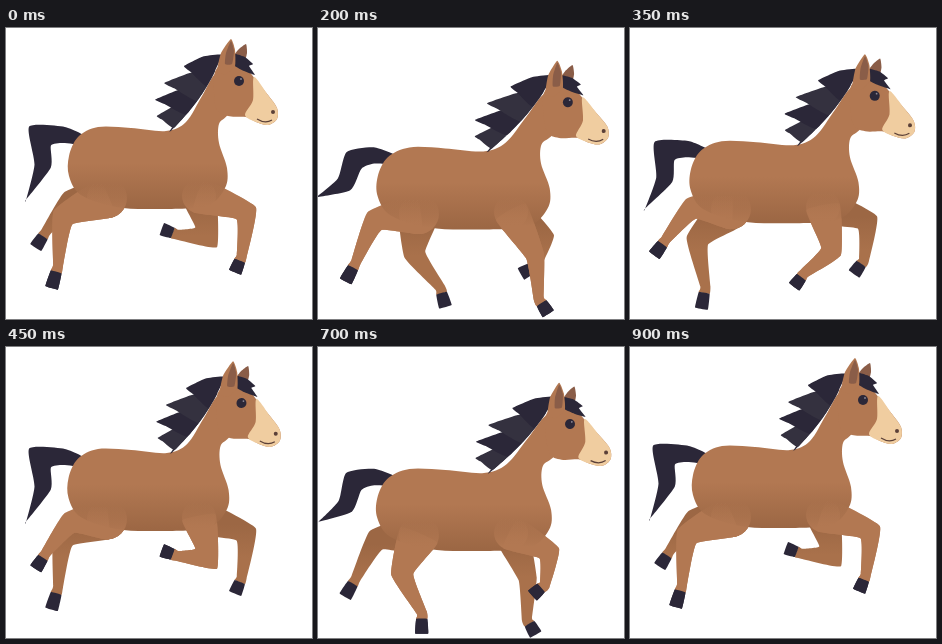
These frames come from a looping animation (306x291 px, 0.95 s). An HTML page with a canvas:

```html
<!DOCTYPE html>
<html>
<head>
<meta charset="utf-8">
<title>Trotting horse</title>
<style>
html, body { margin: 0; width: 100%; height: 100%; overflow: hidden; background: #fff }
canvas { display: block }
</style>
</head>
<body>
<canvas id="stage" width="306" height="291"></canvas>
<script>
const ctx = document.getElementById('stage').getContext('2d');
const LOOP = 950, STEP = 50, CYCLE = 900, HALF = CYCLE / 2;
const COAT = '#b27852', COAT_CLEAR = '#b2785200', SHADE = '#9c6744', FAR = '#a9714b';
const DARK = '#2b2738', STRAND = '#34313f', CREAM = '#f0cda0', EAR = '#8a5d48', LINE = '#5b4038';

// Key times of the gait, shared by the body drop and the bone angles.
const TIMES = [0, 250, 450, 600, 700];
const DROP = [0, 1, .13, .38, 1];

// Angles are degrees from straight down, positive towards the tail.
// Bones shorten by their fold as the leg swings forward, most at foldTime.
const HIND = {
  root: [101, 170], lengths: [43, 43, 21], folds: [.12, .12, .12], foldTime: 480, radii: [20, 10, 5],
  angles: [[66, 83, 84, 0, 23], [6, 28, 38, -38, -27], [16, 30, 33, -25, 0]]
};
const FORE = {
  root: [193, 168], lengths: [46, 36, 17], folds: [.12, .25, .05], foldTime: 550, radii: [17, 9, 5],
  angles: [[-70, -20, -10, -38, -62], [6, 1, 95, 32, 8], [22, -30, 110, 75, 48]]
};

const mix = (a, b, k) => a + (b - a) * k;
const mixPoint = (p, q, k) => [mix(p[0], q[0], k), mix(p[1], q[1], k)];
const bezier = (a, b, c, u) => mixPoint(mixPoint(a, b, u), mixPoint(b, c, u), u);
const pairs = (...flat) => Array.from({ length: flat.length / 2 }, (_, i) => flat.slice(2 * i, 2 * i + 2));
// The trunk sinks, stretches and leans its neck forward.
const sink = drop => ([x, y]) =>
  [x + drop * ((x - 100) * .1 + Math.max(0, 100 - y) * .14), y + 23 * drop];

// Smooth periodic interpolation through the keys.
function sample(keys, time) {
  const t = time % CYCLE, n = TIMES.length;
  const when = i => TIMES[(i + n) % n] + CYCLE * Math.floor(i / n);
  const key = i => keys[(i + n) % n];
  const i = TIMES.findLastIndex(start => start <= t);
  const span = when(i + 1) - when(i), u = (t - when(i)) / span;
  const slope = j => (key(j + 1) - key(j - 1)) / (when(j + 1) - when(j - 1)) * span;
  const d = key(i + 1) - key(i), s = slope(i), e = slope(i + 1);
  return key(i) + u * (s + u * (3 * d - 2 * s - e + u * (s + e - 2 * d)));
}

function shape(points, fill, tension = 0) {
  const n = points.length, p = i => points[(i + n) % n];
  ctx.beginPath();
  ctx.moveTo(...p(0));
  for (let i = 0; i < n; i++) {
    const [a, b, c, d] = [p(i - 1), p(i), p(i + 1), p(i + 2)];
    ctx.bezierCurveTo(
      b[0] + (c[0] - a[0]) * tension, b[1] + (c[1] - a[1]) * tension,
      c[0] - (d[0] - b[0]) * tension, c[1] - (d[1] - b[1]) * tension, ...c);
  }
  ctx.fillStyle = fill;
  ctx.fill();
}

function dot(x, y, r, fill) {
  ctx.beginPath();
  ctx.arc(x, y, r, 0, 7);
  ctx.fillStyle = fill;
  ctx.fill();
}

function fade(y0, y1, from, to) {
  const g = ctx.createLinearGradient(0, y0, 0, y1);
  g.addColorStop(0, from);
  g.addColorStop(1, to);
  return g;
}

// Mitred outline of a tapering polyline.
function limb(points, radii, fill, tension) {
  const normals = points.slice(1).map(([x, y], i) => {
    const dx = x - points[i][0], dy = y - points[i][1], len = Math.hypot(dx, dy);
    return [-dy / len, dx / len];
  });
  const left = [], right = [];
  points.forEach(([x, y], i) => {
    const a = normals[Math.max(i - 1, 0)], b = normals[Math.min(i, normals.length - 1)];
    const k = radii[i] / Math.max(1 + a[0] * b[0] + a[1] * b[1], .7);
    const dx = (a[0] + b[0]) * k, dy = (a[1] + b[1]) * k;
    left.push([x + dx, y + dy]);
    right.unshift([x - dx, y - dy]);
  });
  shape([...left, ...right], fill, tension);
}

function leg({ root, lengths, folds, foldTime, radii, angles }, time, drop, fill) {
  const swing = Math.cos((time - foldTime) / CYCLE * 2 * Math.PI);
  const joints = [[root[0], root[1] + 18 * drop]];
  lengths.forEach((length, i) => {
    const [x, y] = joints[i], a = sample(angles[i], time) * Math.PI / 180;
    const reach = length * (1 - folds[i] * swing);
    joints.push([x - reach * Math.sin(a), y + reach * Math.cos(a)]);
  });
  const [top, knee, fetlock, tip] = joints, cuff = mixPoint(fetlock, tip, .3);
  const paint = fill(top[1]);
  dot(...top, radii[0], paint);
  limb([top, knee, fetlock, cuff], [...radii, 5.5], paint, .06);
  limb([cuff, tip], [5.5, 6.5], DARK, .03);
}

function legs(time, drop, fill) {
  leg(HIND, time, drop, fill);
  leg(FORE, time, drop, fill);
}

function tail(time, drop) {
  const swing = Math.sin((time + 25) / HALF * Math.PI) ** 2;
  const hanging = pairs(80, 113, 58, 107, 34, 108, 37, 138, 21, 172);
  const flying = pairs(80, 112, 56, 107, 36, 112, 26, 136, -2, 149);
  const spine = hanging.map((p, i) => mixPoint(p, flying[i], swing)).map(([x, y]) => [x, y + 23 * drop]);
  limb(spine, [4, 8, 10, 8, 0], DARK, .1);
}

function trunk(drop) {
  const outline = pairs(63, 128, 72, 109, 92, 99, 125, 100, 160, 103, 180, 94, 196, 68, 212, 44,
    232, 60, 222, 86, 213, 96, 213, 115, 221, 140, 219, 160, 200, 178, 150, 181, 110, 179, 75, 167, 63, 148);
  shape(outline.map(sink(drop)), fade(135 + 22 * drop, 180 + 22 * drop, COAT, SHADE), .16);
}

// Overlapping pointed locks from the poll down to the withers.
function mane(drop) {
  const crest = u => bezier([216, 27], [200, 68], [168, 100], u);
  for (let i = 4; i >= 0; i--) {
    const u = i / 4, start = crest(u * .8), end = crest(Math.min(u * .8 + .4, 1.04));
    const tip = bezier([178, 38], [128, 72], [163, 104], u);
    const [x, y] = mixPoint(start, tip, .5);
    shape([start, [x, y - 4], tip, mixPoint(tip, end, .3), end].map(sink(drop)), i % 2 ? STRAND : DARK, .05);
  }
}

function head(drop) {
  ctx.save();
  ctx.translate(233 + 19 * drop, 53 + 24 * drop);
  ctx.rotate(-.07 * drop);
  ctx.translate(-233, -53);
  shape(pairs(228, 28, 233, 21, 240, 16, 241, 25, 238, 34), EAR, .08);
  shape(pairs(208, 50, 213, 38, 226, 33, 240, 40, 249, 51, 262, 67, 271, 80, 271, 91,
    262, 97, 250, 94, 240, 89, 222, 88, 210, 80), COAT, .16);
  shape(pairs(248, 49, 262, 67, 271, 80, 271, 91, 262, 97, 250, 94, 239, 87, 247, 72), CREAM, .14);
  shape(pairs(229, 26, 239, 29, 247, 36, 243, 38, 249, 47, 238, 43, 229, 38), DARK, .05);
  shape(pairs(211, 44, 215, 25, 225, 11, 229, 22, 229, 38, 220, 46), COAT, .08);
  shape(pairs(219, 36, 220, 25, 225, 13, 228, 23, 226, 36), EAR, .08);
  dot(233, 53, 5, DARK);
  dot(235, 51, .9, '#8d8a96');
  dot(267, 84, 2, LINE);
  ctx.beginPath();
  ctx.moveTo(251, 91);
  ctx.quadraticCurveTo(259, 96, 266, 92);
  ctx.strokeStyle = LINE;
  ctx.lineWidth = 1.2;
  ctx.stroke();
  ctx.restore();
}

function draw(time) {
  const drop = sample(DROP, time), belly = 180 + 22 * drop;
  ctx.fillStyle = '#fff';
  ctx.fillRect(0, 0, 306, 291);
  tail(time, drop);
  legs(time + HALF, drop, () => fade(belly - 5, belly + 28, SHADE, FAR));
  legs(time, drop, () => COAT);
  trunk(drop);
  legs(time, drop, y => fade(y - 14, y + 14, COAT_CLEAR, COAT));
  mane(drop);
  head(drop);
}

function frame() {
  draw(Math.floor(performance.now() % LOOP / STEP) * STEP);
  requestAnimationFrame(frame);
}
frame();
</script>
</body>
</html>
```
